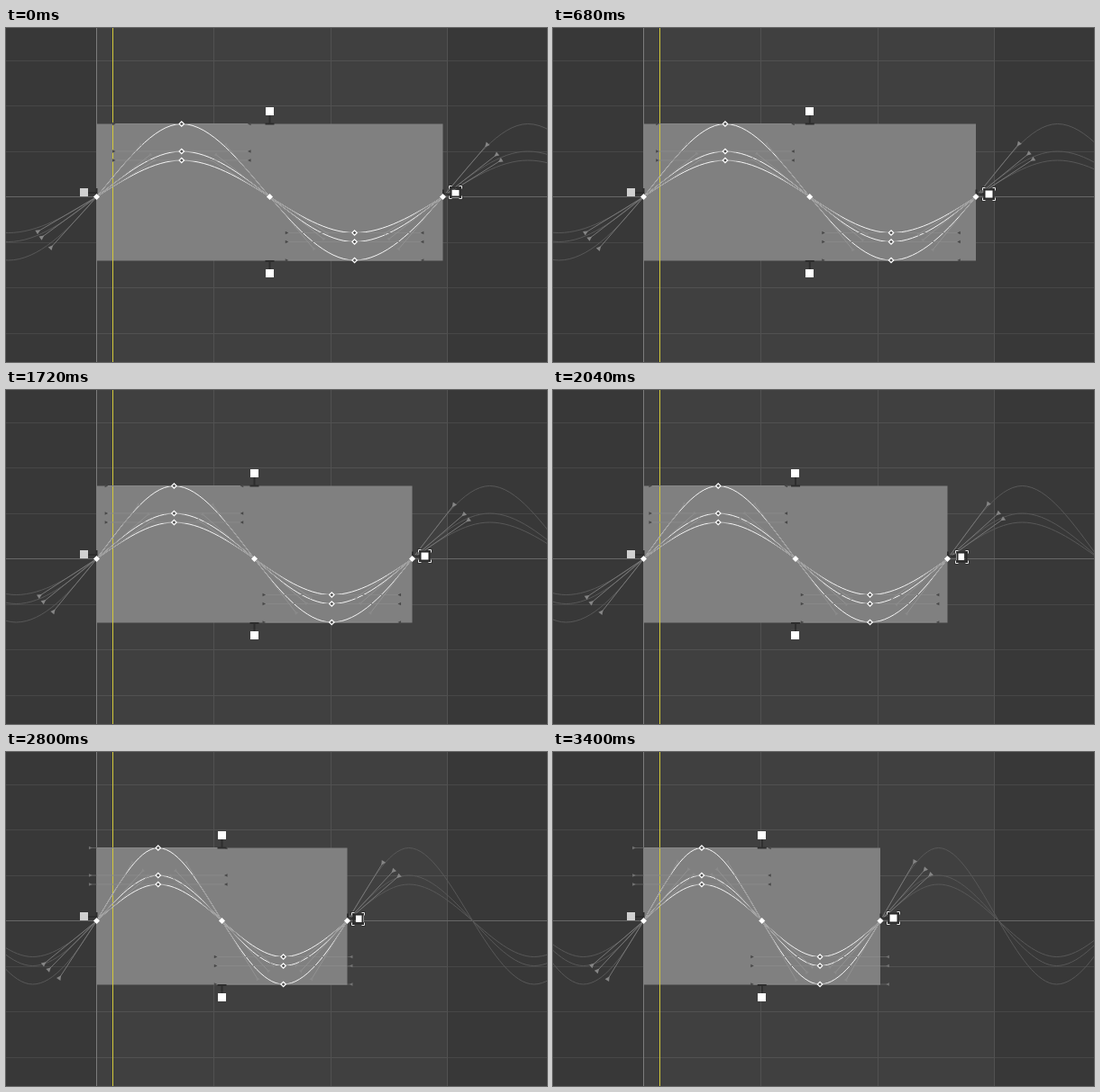
An HTML page with a canvas for the animation above (3520 ms loop, 600 by 371 pixels).

```html
<!DOCTYPE html>
<html>
<head>
<meta charset="utf-8">
<style>
html, body { margin: 0; width: 100%; height: 100%; overflow: hidden; background: #383838; }
canvas { display: block; width: 600px; height: 371px; }
</style>
</head>
<body>
<canvas id="stage" width="600" height="371"></canvas>
<script>
const ctx = document.getElementById('stage').getContext('2d');
const LOOP = 3520, STEP = 40;
const LEFT = 100.5, ZERO = 187.5, TOP = 106.5, BOTTOM = 258.5, REACH = 75;
// [height above zero, depth below zero] of each curve
const WAVES = [[81, 70.5], [50.5, 50], [40.5, 40]];
// [time, right edge, cursor offset from the edge, cursor y]
const KEYS = [
  [0, 484.5, 14, 182.5], [80, 484.5, 14, 182.5], [520, 470, 14.5, 184], [680, 469, 14.5, 184.5],
  [1400, 459, 12.5, 184.5], [2040, 437.5, 15.5, 185], [2400, 407, 6, 185],
  [2800, 378.5, 11.5, 185], [3400, 363, 14, 184.5], [LOOP, 363, 14, 184.5]
];

// Monotone cubic interpolation of one column of KEYS
function track(col, t) {
  const slope = i => KEYS[i + 1] && i >= 0
    ? (KEYS[i + 1][col] - KEYS[i][col]) / (KEYS[i + 1][0] - KEYS[i][0]) : 0;
  const tangent = i => {
    const a = slope(i - 1), b = slope(i);
    return a * b > 0 ? 2 * a * b / (a + b) : 0;
  };
  let i = 0;
  while (i < KEYS.length - 2 && t >= KEYS[i + 1][0]) i++;
  const h = KEYS[i + 1][0] - KEYS[i][0], u = (t - KEYS[i][0]) / h, v = 1 - u;
  return KEYS[i][col] * v * v * (1 + 2 * u) + KEYS[i + 1][col] * u * u * (3 - 2 * u)
    + h * u * v * (tangent(i) * v - tangent(i + 1) * u);
}

function rect(x, y, w, h, color) {
  ctx.fillStyle = color;
  ctx.fillRect(x, y, w, h);
}

function line(x1, y1, x2, y2, color, width = 1) {
  ctx.strokeStyle = color;
  ctx.lineWidth = width;
  ctx.beginPath();
  ctx.moveTo(x1, y1);
  ctx.lineTo(x2, y2);
  ctx.stroke();
}

function clipped(x, w, draw) {
  ctx.save();
  ctx.beginPath();
  ctx.rect(x, 0, w, 371);
  ctx.clip();
  draw();
  ctx.restore();
}

function grid() {
  rect(0, 0, 600, 371, '#383838');
  rect(101, 0, 388, 371, '#404040');
  for (let i = 0; i < 7; i++) {
    const y = Math.floor(36 + i * 50.5) + 0.5;
    line(0, y, 600, y, '#474747');
    line(101, y, 489, y, '#515151');
  }
  for (const x of [230.5, 360.5, 489.5]) line(x, 0, x, 371, '#515151');
  line(0, 187.5, 600, 187.5, '#676767');
  line(100.5, 0, 100.5, 371, '#7c7c7c');
}

// One period of a curve through five keys with smooth tangents
function wave(x, period, [up, down], color) {
  const slope = 3 * (up + down) / period;
  const keys = [[0, 0, -slope], [.2455, -up, 0], [.5, 0, slope], [.745, down, 0], [1, 0, -slope]]
    .map(([f, y, m]) => [x + f * period, ZERO + y, m]);
  ctx.strokeStyle = color;
  ctx.lineWidth = 1;
  ctx.beginPath();
  ctx.moveTo(keys[0][0], keys[0][1]);
  for (let i = 1; i < 5; i++) {
    const [ax, ay, am] = keys[i - 1], [bx, by, bm] = keys[i], d = (bx - ax) / 3;
    ctx.bezierCurveTo(ax + d, ay + am * d, bx - d, by - bm * d, bx, by);
  }
  ctx.stroke();
}

// Tangent handle of fixed length, its arrow pointing back at the key
function handle(x, y, slope, side, lineColor, arrowColor, size) {
  const dx = side * REACH / Math.hypot(1, slope);
  const ex = x + dx, ey = y + dx * slope;
  line(x, y, ex, ey, lineColor);
  ctx.save();
  ctx.translate(ex, ey);
  ctx.rotate(Math.atan2(y - ey, x - ex));
  ctx.fillStyle = arrowColor;
  ctx.beginPath();
  ctx.moveTo(size, 0);
  ctx.lineTo(-size, size);
  ctx.lineTo(-size, -size);
  ctx.fill();
  ctx.restore();
}

function diamond(x, y, hollow) {
  ctx.save();
  ctx.translate(x, y);
  ctx.rotate(Math.PI / 4);
  rect(-2.5, -2.5, 5, 5, '#fff');
  if (hollow) rect(-1.3, -1.3, 2.6, 2.6, '#505050');
  ctx.restore();
}

// Scale grip joined to the box edge by a dark T
function grip(x, y, dx, dy, color) {
  const ex = x + dx * 14, ey = y + dy * 14;
  line(x, y, ex, ey, '#2d2d2d', 2);
  line(ex - dy * 5, ey - dx * 5, ex + dy * 5, ey + dx * 5, '#2d2d2d', 2);
  rect(Math.round(x) - 5, Math.round(y) - 5, 9, 9, color);
}

function cursor(x, y) {
  ctx.save();
  ctx.translate(Math.floor(x) + 0.5, Math.floor(y) + 0.5);
  ctx.strokeStyle = '#2b2b2b';
  ctx.lineWidth = 2;
  ctx.strokeRect(-5, -5, 10, 10);
  for (const [color, width] of [['#303030', 2.5], ['#e8e8e8', 1]]) {
    ctx.strokeStyle = color;
    ctx.lineWidth = width;
    ctx.beginPath();
    for (const sx of [-1, 1]) for (const sy of [-1, 1]) {
      ctx.moveTo(sx * 4, sy * 7);
      ctx.lineTo(sx * 7, sy * 7);
      ctx.lineTo(sx * 7, sy * 4);
    }
    ctx.stroke();
  }
  ctx.restore();
}

function draw(t) {
  const right = track(1, t), period = right - LEFT, mid = LEFT + period / 2;
  const peak = LEFT + period * .2455, trough = LEFT + period * .745;

  grid();
  rect(LEFT, TOP, period, BOTTOM - TOP, '#808080');
  rect(118, 0, 1, 371, '#d2c93a');

  for (const w of WAVES) {
    for (const n of [-1, 1, 2]) wave(LEFT + n * period, period, w, '#585858');
    wave(LEFT, period, w, '#f4f4f4');
  }

  const flatHandles = (lineColor, arrowColor) => {
    for (const [up, down] of WAVES) for (const side of [-1, 1]) {
      handle(peak, ZERO - up, 0, side, lineColor, arrowColor, 1.8);
      handle(trough, ZERO + down, 0, side, lineColor, arrowColor, 1.8);
    }
  };
  clipped(LEFT, period, () => flatHandles('#888', '#484848'));
  clipped(0, LEFT, () => flatHandles('#5c5c5c', '#747474'));
  clipped(right, 600, () => flatHandles('#5c5c5c', '#747474'));

  for (const [up, down] of WAVES) {
    const slope = 3 * (up + down) / period;
    for (const [x, m, side] of [[LEFT, -slope, 1], [mid, slope, -1], [mid, slope, 1], [right, -slope, -1]])
      handle(x, ZERO, m, side, '#929292', '#8a8a8a', 2);
    handle(LEFT, ZERO, -slope * .94, -1, '#777', '#858585', 2.6);
    handle(right, ZERO, -slope, 1, '#777', '#858585', 2.6);
  }

  grip(86.5, 183, 1, 0, '#d0d0d0');
  grip(mid, 92.5, 0, 1, '#fff');
  grip(mid, 273, 0, -1, '#fff');
  grip(right + 14.5, 184.5, -1, 0, '#fff');

  for (const [up, down] of WAVES) {
    diamond(peak, ZERO - up, true);
    diamond(trough, ZERO + down, true);
  }
  for (const x of [LEFT, mid, right]) diamond(x, ZERO, false);
  cursor(right + track(2, t), track(3, t));
}

const start = performance.now();
function tick() {
  const t = (performance.now() - start) % LOOP;
  draw(Math.floor(t / STEP) * STEP);
  requestAnimationFrame(tick);
}
tick();
</script>
</body>
</html>
```
